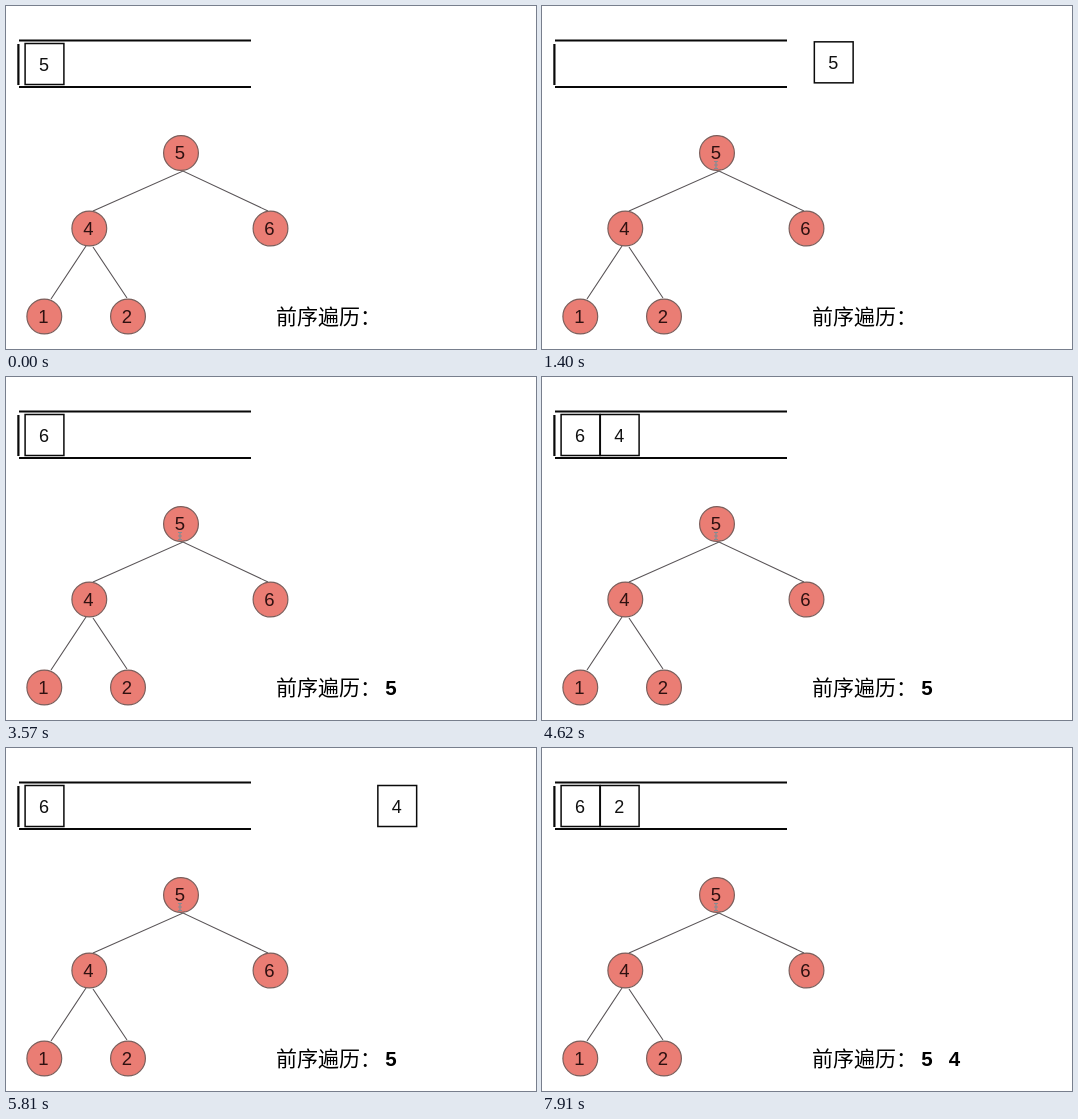
An HTML page for the animation above (8 s loop, 530x343 px).

```html
<!DOCTYPE html>
<html lang="zh-CN">
<head>
<meta charset="utf-8">
<title>前序遍历</title>
<style>
html, body { margin: 0; width: 100%; height: 100%; overflow: hidden; background: #fff; }
svg { display: block; width: 530px; height: 343px; }
text { font-family: "Liberation Sans", sans-serif; }
.digit { font-size: 18.5px; text-anchor: middle; }
.node circle { fill: #ea7d74; stroke: #7b5f5c; stroke-width: 1.2; }
.node text { fill: #2f1111; }
.box rect { fill: #fff; stroke: #0a0a0a; stroke-width: 1.5; }
.box text { font-size: 18px; fill: #111; }
.label { font: 500 21px "Noto Sans CJK SC", "Noto Sans CJK", sans-serif; }
.out { font-size: 20.5px; font-weight: bold; text-anchor: middle; }
.edges { stroke: #5a5558; stroke-width: 1.1; }
.stack { stroke: #080808; stroke-width: 2.2; }
.mark { stroke: #858c92; stroke-width: 1.2; fill: none; }
</style>
</head>
<body>
<svg id="stage" viewBox="0 0 530 343">
  <path class="stack" fill="none" d="M13 34.5H245M13 81H245M12.4 38V79"/>
  <path class="edges" fill="none" d="M87 205L177 165L262 205M80 240L45 293M87 241L121 292"/>
  <text class="label" x="270" y="318">前序遍历：</text>
</svg>
<script>
const LOOP = 8000, STEP = 70, MOVE = 1000;
const stage = document.getElementById('stage');

function add(parent, tag, attrs, text = '') {
  const el = document.createElementNS(stage.namespaceURI, tag);
  for (const key in attrs) el.setAttribute(key, attrs[key]);
  el.textContent = text;
  parent.append(el);
  return el;
}

function addNode(digit, x, y) {
  const g = add(stage, 'g', { class: 'node' });
  add(g, 'circle', { cx: x, cy: y, r: 17.4 });
  add(g, 'text', { class: 'digit', x: x - 1, y: y + 6.3 }, digit);
}

function addBox(digit) {
  const g = add(stage, 'g', { class: 'box' });
  add(g, 'rect', { x: -19.4, y: -20.5, width: 38.8, height: 41 });
  add(g, 'text', { class: 'digit', x: -0.5, y: 7 }, digit);
  return g;
}

[[5, 175, 147], [4, 83.3, 222.5], [6, 264.5, 222.5], [1, 38.3, 310.5], [122, 0, 0]]
  .slice(0, 4).concat([[2, 122, 310.5]])
  .forEach(node => addNode(...node));

// Boxes are visible in [show, hide) and slide between two centres from time `start`.
const boxes = [
  { digit: 5, show: 0, hide: 3080, start: 792, from: [38.5, 58], to: [418.5, 55.5] },
  { digit: 6, show: 3570, hide: LOOP, from: [38.5, 58] },
  { digit: 4, show: 3990, hide: 6720, start: 4841, from: [77.7, 58], to: [392, 58] },
  { digit: 2, show: 7280, hide: LOOP, from: [77.7, 58] }
].map(box => ({ ...box, el: addBox(box.digit) }));

const outputs = [[5, 385, 2450], [4, 412.5, 6020]].map(([digit, x, show]) =>
  ({ show, hide: LOOP, el: add(stage, 'text', { class: 'out', x, y: 318 }, digit) }));

const markPath = { class: 'mark', d: 'M172 155.5h4M172 159h4M172 162.5h4M174 155.5v7' };
const marks = [[1330, 2450], [3430, LOOP]].map(([show, hide]) =>
  ({ show, hide, el: add(stage, 'path', markPath) }));

const ease = u => (1 - Math.cos(Math.PI * Math.min(1, Math.max(0, u)))) / 2;

function draw(now) {
  const t = Math.min(Math.floor((now % LOOP) / STEP) * STEP, 7910);
  for (const { el, show, hide } of [...boxes, ...outputs, ...marks])
    el.style.display = t >= show && t < hide ? '' : 'none';
  for (const { el, from, to = from, start = 0 } of boxes) {
    const k = ease((t - start) / MOVE);
    const [x, y] = from.map((a, i) => a + (to[i] - a) * k);
    el.setAttribute('transform', `translate(${x} ${y})`);
  }
}

const origin = performance.now();
(function frame() {
  draw(performance.now() - origin);
  requestAnimationFrame(frame);
})();
</script>
</body>
</html>
```
